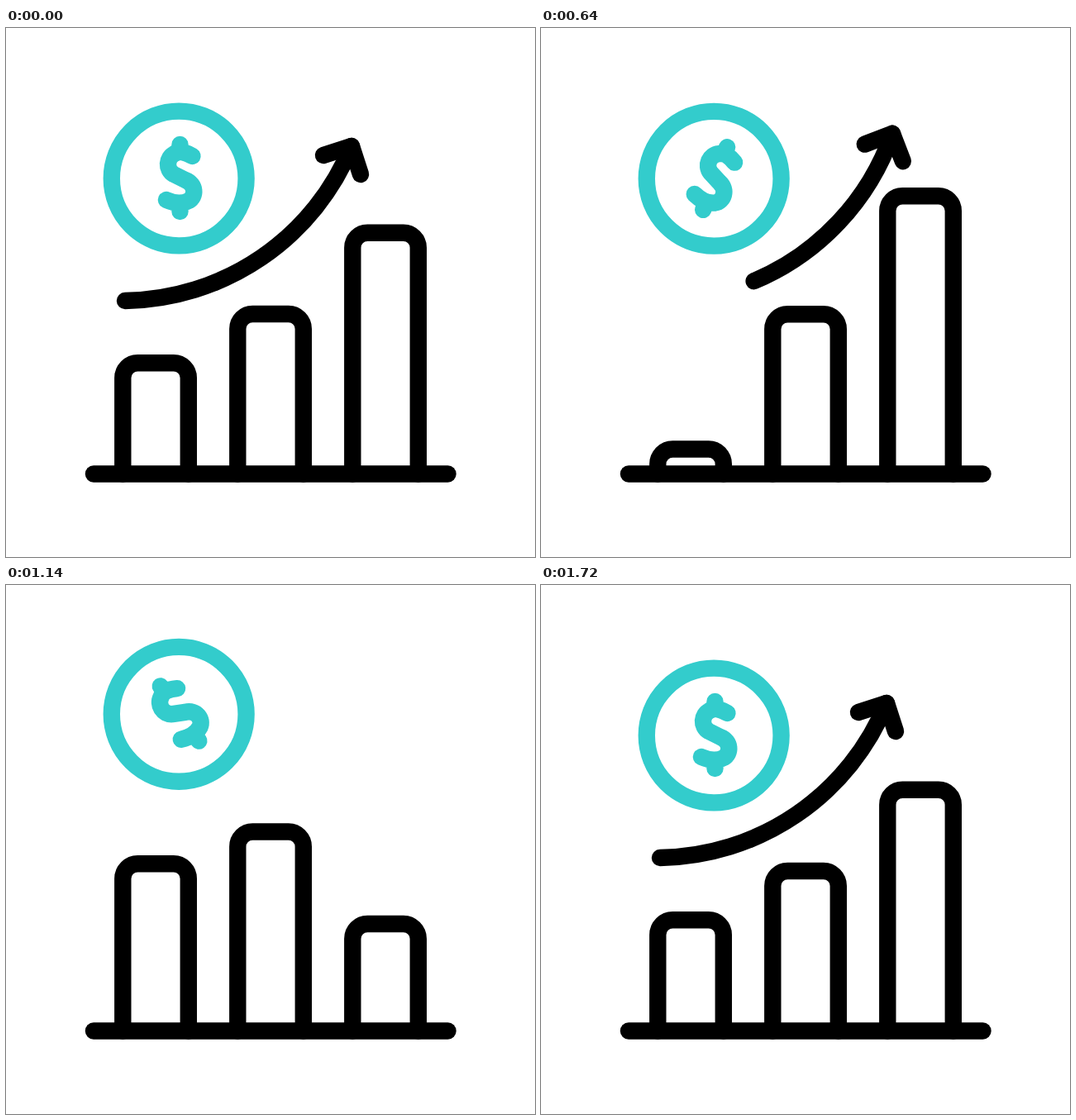
An HTML page for the animation above (2400 ms loop, 640x640 px).

```html
<!DOCTYPE html>
<html lang="en">
<head>
<meta charset="utf-8">
<title>Growth chart</title>
<style>
  html, body { margin: 0; width: 100%; height: 100%; overflow: hidden; background: #fff; }
  svg { display: block; width: 100vw; height: 100vh; }
  svg * { fill: none; stroke-width: 20.4; stroke-linecap: round; stroke-linejoin: round; }
  .ink { stroke: #000; }
  .coin { stroke: #33cccc; }
</style>
</head>
<body>
<svg viewBox="0 0 640 640">
  <g id="coin" class="coin">
    <circle cx="209.2" cy="182" r="81.4"/>
    <path id="dollar" d="M225.5 155C217 150 209 148 204 152C194 157 193 171 203 177L217 184C230 189 230 204 221 209C213 213 203 212 194 208M210.5 141V150M210.5 222V213"/>
  </g>
  <g class="ink">
    <path d="M106 539.5H534.5"/>
    <path class="bar"/>
    <path class="bar"/>
    <path class="bar"/>
    <g id="arrow">
      <path id="shaft" pathLength="1" d="M144 330A301 301 0 0 0 418 143"/>
      <path id="head" pathLength="1" d="M384 154L418 143L429 177"/>
    </g>
  </g>
</svg>
<script>
const LOOP = 2400, STEP = 20, FLOOR = 539.5;
const BAR_TOPS = [405.3, 346, 247.8];
const BEATS = [0, 382, 430, 800, 1125, 1445, 1720];

const $ = id => document.getElementById(id);
const barPaths = document.querySelectorAll('.bar');

function ease(t, start, end) {
  const u = Math.min(Math.max((t - start) / (end - start), 0), 1);
  return u * u * (3 - 2 * u);
}

// Glide through the values, reaching each one on its beat.
function swing(t, values, beats = BEATS) {
  return values.reduce((sum, v, i) =>
    i ? sum + (v - values[i - 1]) * ease(t, beats[i - 1], beats[i]) : v, 0);
}

function turn(el, angle, x, y) {
  el.setAttribute('transform', `rotate(${angle} ${x} ${y})`);
}

function trim(path, start, end) {
  path.style.visibility = end - start > 0.001 ? 'visible' : 'hidden';
  path.setAttribute('stroke-dasharray', `${Math.max(end - start, 0)} 2`);
  path.setAttribute('stroke-dashoffset', -start);
}

// Every bar stretches, drops to the floor, overshoots and settles, one after another.
function barTop(i, t) {
  const top = BAR_TOPS[i];
  const drop = FLOOR - 10 - top;
  const over = 76 - 9 * i;
  const fall = t - 140 * i, rise = t - 150 * i;
  return top - 45 * ease(fall, 0, 382)
    + (45 + drop) * ease(fall, 420, 700)
    - (drop + over) * ease(rise, 700, 1050)
    + over * ease(rise, 1090, 1340);
}

function barShape(i, t) {
  const x = 141.3 + 139 * i, top = barTop(i, t);
  const r = Math.min(18, FLOOR - top);
  return `M${x} ${FLOOR}V${top + r}a${r} ${r} 0 0 1 ${r} ${-r}` +
    `h${79.5 - 2 * r}a${r} ${r} 0 0 1 ${r} ${r}V${FLOOR}`;
}

// The arrow swings off while erased from its tail, then is drawn again on the way back.
function drawArrow(t) {
  const leaving = t < 1000;
  const angle = leaving ? swing(t, [0, 17.8, 17.8, -16.9]) : 20.1 * (1 - ease(t, 1300, 1700));
  turn($('arrow'), angle, 136, 2.5);
  if (leaving) {
    trim($('shaft'), ease(t, 540, 825), 1);
    trim($('head'), ease(t, 740, 860), 1);
  } else {
    trim($('shaft'), 0, ease(t, 1220, 1555));
    trim($('head'), 0, ease(t, 1500, 1640));
  }
}

function draw(t) {
  $('coin').setAttribute('transform', `translate(0 ${swing(t, [0, -52, -52, 35, -26, 22.3, 0])})`);
  turn($('dollar'), swing(t, [0, 72, 72, -13, -35.5, 21.5, 0]), 209.8, 182);
  drawArrow(t);
  barPaths.forEach((path, i) => path.setAttribute('d', barShape(i, t)));
}

const origin = performance.now();
function tick() {
  const t = (performance.now() - origin) % LOOP;
  draw(Math.floor(t / STEP) * STEP);
  requestAnimationFrame(tick);
}
tick();
</script>
</body>
</html>
```
